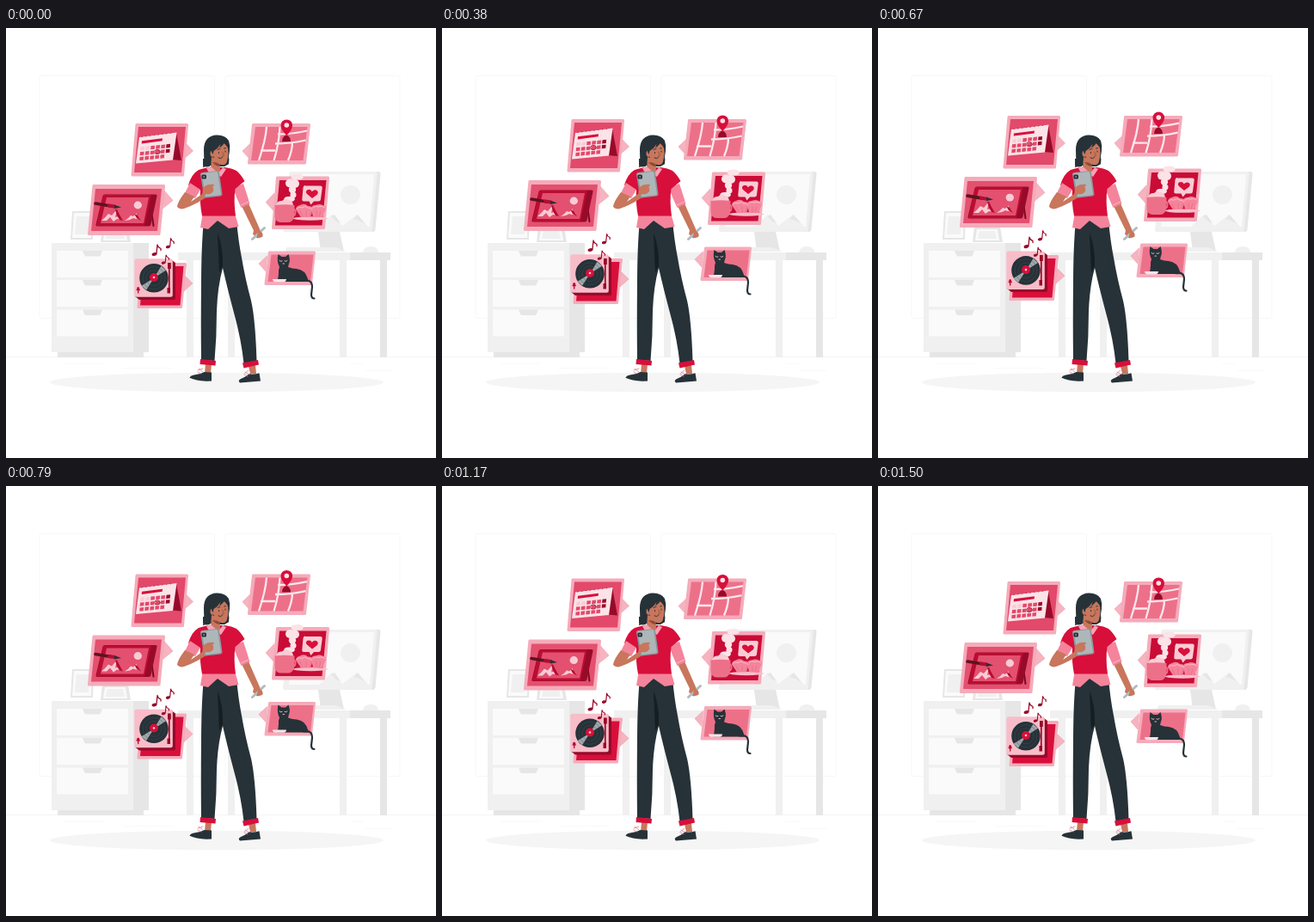
An HTML page that plays this animation: 500x500 px, repeating every 1.54 s.

```html
<!DOCTYPE html>
<html lang="en">
<head>
<meta charset="utf-8">
<title>Floating cards</title>
<style>
  html, body { margin: 0; width: 100%; height: 100%; overflow: hidden; background: #fff; }
  svg { display: block; width: 100%; height: 100%; }
  .g1 { fill: #fafafa; } .g2 { fill: #f5f5f5; } .g3 { fill: #f0f0f0; } .g4 { fill: #e6e6e6; }
  .ink { fill: #263238; } .skin { fill: #c8765c; } .red { fill: #d80f3b; } .dark { fill: #980a2a; }
  .mid { fill: #ed7089; } .rose { fill: #e2496a; } .pink { fill: #f4849b; } .pale { fill: #f9ccd5; }
  .line { fill: none; stroke-linecap: round; stroke-linejoin: round; }
  .card { fill: #f5abba; stroke: #f5abba; stroke-width: 3; stroke-linejoin: round; }
  .tail { fill: #f6b3c0; stroke: #f19aac; stroke-width: .6; }
</style>
</head>
<body>
<svg viewBox="0 0 500 500" xmlns="http://www.w3.org/2000/svg">
  <rect width="500" height="500" fill="#fff"/>

  <!-- room -->
  <g fill="none" stroke="#f7f7f7">
    <rect x="39" y="55.500" width="203.500" height="282" rx="2"/>
    <rect x="255" y="55.500" width="203" height="282" rx="2"/>
    <path d="M0 382.500H500" stroke="#efefef" stroke-width=".7"/>
    <path d="M400 390h16M417 398.500h31M136 395.500h59M68 390h48" stroke-width=".7"/>
  </g>
  <ellipse class="g2" cx="245" cy="412" rx="194" ry="11.300"/>

  <!-- cabinet -->
  <path class="g4" d="M60 376h100v7H60z"/>
  <path class="g4" d="M148 250h18v127h-18z"/>
  <path class="g3" d="M53 250h95v127H53z"/>
  <g id="drawers"></g>
  <path class="g4" d="M77 213h25l-1 33H75z"/><path class="g1" d="M79 215h21l-1 29H77z"/><path class="g3" d="M82 219h15l-1 21H80z"/>
  <path class="g4" d="M112 231h30l3 18h-35z"/><path class="g1" d="M115 234h24l2 13h-28z"/><path class="g3" d="M118 236h18l2 9h-22z"/>

  <!-- desk -->
  <path class="g3" d="M210 270h8v113h-8zM258 270h8v113h-8zM388 270h8v113h-8z"/>
  <path class="g4" d="M435 270h8v113h-8z"/>
  <path class="g3" d="M200 261h200v9H200z"/>
  <path class="g4" d="M400 261h47v9h-47z"/>
  <path class="g4" d="M363 237h25l5 23h-27z"/>
  <path class="g3" d="M326 255h57l13 5h-71z"/>
  <path class="g3" d="M415 261q1-7 9-7q9 0 9 7z"/>
  <path class="g4" d="M333 167h100q3 0 2.500 3l-6 64q-.5 3-3 3H325q-3 0-2.600-3l7-64q.5-3 3.600-3z"/>
  <path class="g3" d="M332 167h97q3 0 2.600 3l-6 67H325q-3 0-2.600-3l7-64q.4-3 2.600-3z"/>
  <path class="g1" d="M335 170h93l-5 61H329z"/>
  <ellipse class="g3" cx="400.500" cy="194" rx="11.500" ry="11"/>
  <path class="g3" d="M364 231l15-14 8 7 4 7zM390 231l18-14 13 14z"/>
  <path class="g4" d="M378 219l4-2 7 10-5-2zM404 222l5-5 9 11-7-4z"/>

  <!-- woman -->
  <path class="skin" d="M232 390l7 1-1 11h-7zM282 393l8-1 1 10h-7z"/>
  <path class="ink" d="M239 400.500v10l-6 .3q-12-.4-19.500-4q.5-2.500 5-3.300q7-.5 12-3.500zM283 402q5 1.500 11.500-.8l1.500 9.300-24 2q-3-2.500 1-4.500q5-2 10-6z"/>
  <path class="line" d="M223 400l4 2m-3-6 5 4m-6-2 6-2M277 403l4 2m-3-5 5 3m-6-1 5-4" stroke="#d98293" stroke-width=".8"/>
  <path class="ink" d="M230 223h38q2 24 6 44q4 24 11 50q5 22 6.500 71l-15 2q-3-28-11-57q-8-30-13.500-54q-6 22-7 50q0 30-2.500 58l-15.500-1q-.5-46 0-86q0-46 3-77z"/>
  <path d="M246 238q1 26 2 46l4-7q1-20-6-39z" fill="#151e23"/>
  <path class="red" d="M226 385l18 2-.5 5.500-18-1.500zM275 389.500l18-3.500 1 5.500-17.500 4z"/>
  <path class="skin" d="M274 207l8-3 14 32q4 4 2 7l-6 1.500-5-5 1-4z"/>
  <path class="line" d="M286.500 245.500l14-13" stroke="#b4babd" stroke-width="3"/>
  <path class="skin" d="M293 235q5 1 5 6q-2 4-6 2z"/>
  <path class="pink" d="M264 186l12-5q4 12 7.500 23.500l-10 4.500q-5-10-9.500-23z"/>
  <path class="line" d="M273 206l9-4" stroke="#f9bac6" stroke-width="1"/>
  <path class="pink" d="M228.500 217h38l4 14-11.500 2-13-9-11 10-9-2z"/>
  <path class="red" d="M224 165q9-3 14-3h16q9 1 14 4q5 4 9.500 12l-11 9q-2 14 .5 31.500h-39q-3-15-2-30l-14-6q4-13 12-17.500z"/>
  <path class="pink" d="M214 180l12 8-6 10-13-4z"/>
  <path class="skin" d="M208 191l11 5-4 6 19-13 4 4q-14 11-31 17q-5 1.500-8-2q0-5 9-17z"/>
  <path class="ink" d="M234 129q5-5 12-4.500q9 0 13 6.500q2 6 1 12q-2 8-1 15l-5 3h-7l-10-1-8 2q2-10 1-20q0-9 4-13z"/>
  <path class="skin" d="M239 150l9 3 1 11q2 4-4 6q-5-1-7-6z"/>
  <path d="M240 156q4 5 9 5v-4z" fill="#8d4937"/>
  <path class="skin" d="M240 142q6-3 9-10q7 2 9.500 9q.5 8-1.500 15q-3 5-8 2.500q-6-2-7.500-9q-4 1-4-3.500q0-3.500 2.500-4z"/>
  <path class="ink" d="M239 144q-4-9 4-13q7-4 12 0q-2 6-8 9q2-2 2.500-5q-3 5-8 8l-1 4zM252 132q6 3 6.500 8l.5 4 1-7-3-6zM258.500 147q1.500 6 .5 11l-4 2q3-5 3.500-13zM229 152h8q-1 6 0 9l-4 .5-4-2z"/>
  <g class="line" stroke="#263238" stroke-width=".9"><path d="M247.500 144.500v1.200M255 143v1.200M246 141.500l3-1M253.500 140l2-.3M247 151q3 2 5-1"/></g>
  <path class="line" d="M251.500 144l2 4-1.800.5" stroke="#8d4937" stroke-width=".7"/>
  <path d="M233 163l5-2 9 8 5-7 4 2-6 9-5-3-6 4z" fill="#f6a3b4"/>
  <path d="M228 168l17.500-2q2-.2 2.500 2l3.500 25q.3 2-2 2.400l-17 2q-2 .2-2.400-2l-4.100-25q-.3-2 2-2.400z" fill="#8b979c"/>
  <path d="M227.500 169l17-2q1.500 0 1.800 1.500l3.500 24q.2 1.500-1.300 1.800l-16.500 2z" fill="#adb6b9"/>
  <rect class="ink" x="227.500" y="170.500" width="5.500" height="5" rx="1.500"/>
  <circle cx="230.200" cy="173" r="1.100" fill="#7d898e"/>
  <path class="skin" d="M229 186q4-4 8-4q5-1 5 1l-2 2q2 1 1 3q1 2-1 3q-2 3-7 2l-5 3z"/>

  <g id="cards">
    <!-- calendar -->
    <path class="tail" d="M208 133l9.500 10-10.500 9z"/>
    <path class="card" d="M152 112.500h58.500l-5 58.500H147z"/>
    <path class="rose" d="M154 115h55l-5 53h-55z"/>
    <path class="dark" d="M198 122l6 32-11-1z"/>
    <path d="M155 127l43.500-5.500-4.500 32-43 4z" fill="#fbe3e8"/>
    <path class="red" d="M158 131.300l24-3-.3 3-24 3.200z"/>
    <g id="days" transform="matrix(1 -.1 -.08 1 156.500 138.300)"></g>
    <ellipse class="line" cx="176" cy="144" rx="3.200" ry="2.600" stroke="#980a2a" stroke-width=".8"/>
    <path class="line" d="M158 126.300l38-4.700" stroke="#b8405c" stroke-width="1.400" stroke-dasharray=".1 4.700"/>

    <!-- tablet -->
    <path class="tail" d="M184 189l10 11.500-12 9.500z"/>
    <path class="card" d="M102 183.500h81.500l-5.500 56H96.500z"/>
    <path d="M104 187h77l-5 49H99z" fill="#e4506f"/>
    <path class="line" d="M168 205l3.500 25" stroke="#7c0821" stroke-width="2"/>
    <path class="dark" d="M115 193.500h59q2 0 1.500 2l-7 33q-.4 2-2.500 2h-60q-2 0-1.500-2l8-33q.5-2 2.500-2z"/>
    <path d="M114.500 194h53q1.500 0 1 2l-7 32q-.5 2-2 2h-53q-1.500 0-1-2l7-32q.5-2 2-2z" fill="#ba0d33"/>
    <path d="M117 197h49l-6 30h-50z" fill="#e4506f"/>
    <ellipse class="pale" cx="153.300" cy="206" rx="4.700" ry="4.400"/>
    <path class="pale" d="M111 224q5-4 8-8l4 2 6-7-2 9 4-1 3 4-5-1-4 3-4-5-4 4zM138 224q5-3 7-6l3 1 4-4-1 5 5 1-5 1-3-1-4 2z"/>
    <path d="M127 211h2l3 6 4 7-4-1-3-5zM149 216l4 2 4 6-5-3z" fill="#b40c31"/>
    <path class="line" d="M104 204l18 3" stroke="#5d1320" stroke-width="3.600"/>
    <path class="line" d="M120 206.500l6 1" stroke="#b40c31" stroke-width="4"/>
    <path class="ink" d="M126 205.500l8 3-8 1.500z"/>

    <!-- turntable -->
    <path class="tail" d="M208 288l9 9-10 9z"/>
    <path class="card" d="M158 274.500h50.500l-5 50H154z"/>
    <path class="red" d="M160 277h46.500l-4 45.500H156z"/>
    <path class="dark" d="M151 270h42l4 3v41q0 2-2 2h-40l-5-4z"/>
    <rect x="149.300" y="268.300" width="44.500" height="44.500" rx="2.500" fill="#f8bdc9"/>
    <circle class="ink" cx="172" cy="290.800" r="16.800"/>
    <path d="M172 290.800l8.500-14 5.500 5zM172 290.800l-9 14-5.500-5z" fill="#a0a8ab"/>
    <g class="line" stroke="#485359" stroke-width=".4"><circle cx="172" cy="290.800" r="13"/><circle cx="172" cy="290.800" r="9"/></g>
    <circle class="red" cx="172" cy="290" r="5"/>
    <circle class="pale" cx="172" cy="290" r="1.300"/>
    <path class="line" d="M189.800 274v31" stroke="#980a2a" stroke-width="1.700"/>
    <path class="dark" d="M188 273h3.800v7H188zM187.500 302h3.500v6.500h-3.500z"/>
    <path class="line" d="M153.700 302v6m-1.600-3.500h3.200" stroke="#b40c31" stroke-width="1.300"/>
    <circle cx="153.700" cy="302.800" r="1.600" fill="#b40c31"/>
    <g class="dark">
      <g id="note"><ellipse cx="172.500" cy="263" rx="3" ry="1.900" transform="rotate(-15 172.500 263)"/><path class="line" d="M175 262l1-10q.5 3 4 4.500v2" stroke="#980a2a" stroke-width="1.300"/></g>
      <use href="#note" transform="translate(33.200 17.800) scale(.9)"/>
      <use href="#note" transform="translate(40 54.800) scale(.83)"/>
    </g>

    <!-- map -->
    <path class="tail" d="M284.500 134l-9.500 9 8 9z"/>
    <path class="card" d="M287.500 112.500h65l-5 44.500h-65z"/>
    <path class="mid" d="M290 115h60.500l-5 39H285z"/>
    <g fill="none" stroke="#fce8ec" stroke-width="2.300">
      <path d="M303 115q-1 15-9 39M318.500 115q-1 20-7 39M316 123.500q16 0 34-4M296 142.500h17M313 134.500q18 0 35.500-4M333 132.500q0 10-5 21.500"/>
    </g>
    <path class="dark" d="M321 132q0-6 5-7.500q5 1.500 5 7.500z"/>
    <path class="red" d="M326.300 125q-6.800-7-6.800-12a6.800 6.600 0 0 1 13.600 0q0 5-6.800 12z"/>
    <circle cx="326.300" cy="113" r="2.800" fill="#fbe3e8"/>

    <!-- cafe -->
    <path class="tail" d="M312 192l-9.800 10.500 8.800 10z"/>
    <path class="card" d="M315.500 174h59l-5 58.500h-59z"/>
    <path d="M318 177h54.500l-5 52.500h-54.500z" fill="#c90c36"/>
    <g fill="#fbe3e8">
      <path d="M332 175q-2-5 4-5q4-1 7 0q4 2 2 5q-3 2-6 1l-5 1z"/>
      <circle cx="330" cy="180.500" r="5"/><circle cx="336" cy="181" r="5"/>
      <circle cx="333" cy="188" r="4.200"/><circle cx="334" cy="194" r="3.500"/>
      <path d="M323 203q-1-8 6-7q6-2 7 3q-1 3-5 3z"/>
    </g>
    <path class="pale" d="M314 207q1-7 7-6q4-4 8-1q5 1 5 7z"/>
    <path class="line" d="M333 210q5 1 3 7l-4 3" stroke="#ed7089" stroke-width="2"/>
    <path class="mid" d="M312.500 206q12-1.500 23 0l-.5 14q-2 6-7 6h-8q-6 0-7.500-6z"/>
    <path class="pale" d="M346 183l19.500.5q2.500.2 2.200 2.500l-1.700 13q-.2 2.500-3 2.500h-5l-3.500 4-2-4h-6q-2.500 0-2.200-2.500l1.200-13.500q.2-2.500 2.500-2.500z"/>
    <path class="red" d="M356 198l-6-5q-2.500-3 .5-4.800q3.500-1.200 5.300 2q2.800-3 5.700-1.300q2.400 2 .2 4.800z"/>
    <ellipse cx="354" cy="221.500" rx="20" ry="2.200" fill="#f8bdc9"/>
    <path class="pink" d="M337 211q0-4 5-5q5-3 9 1q6 0 6 4l-3 9h-11zM355 210q0-4 5-4q5-2 8 0q5 1 4 4l-4 10h-11z"/>
    <path class="line" d="M342 213l3 6m4-6v6m6-6-2 6m8-6v6m5-6-2 6" stroke="#ed7089" stroke-width="1"/>
    <path class="line" d="M338 210q3-3 6-1q4-3 7 0q3 0 5 2m1-2q3-3 6-1q4-2 8 1" stroke="#f8bdc9" stroke-width="1"/>

    <!-- cat -->
    <path class="tail" d="M303.500 265l-9.500 9 8 9z"/>
    <path class="card" d="M306.500 261h52l-4 36.500h-52.500z"/>
    <path class="mid" d="M308.500 263.500h49l-3.500 31.500h-49.500z"/>
    <path class="ink" d="M316.500 263l4 3h4.500l3.500-3q2.500 7 .5 11l-1 4q5 2 10 2q10 1 13 12l2 3h-38q2-5 2-10q-.5-4 1-7q-3.500-7-1.500-15z"/>
    <path class="line" d="M346 294h6q4 1 4 7l-1 9q0 4.500 3.500 4.500" stroke="#263238" stroke-width="2.200"/>
    <path class="line" d="M318 270.500q1.500 1.500 3 .5m3 0q1.500 1 3-.5M322 274h1.500" stroke="#f9ccd5" stroke-width=".9"/>
    <path d="M310 292h16q-.5 3.300-3 3.300h-10q-2.500 0-3-3.300z" fill="#fbe3e8"/>
  </g>
</svg>
<script>
  const byId = id => document.getElementById(id);

  byId('drawers').innerHTML = [259, 293, 327.5].map(y =>
    `<path class="g1" d="M59 ${y}h83v31H59z"/>` +
    `<path class="g4" d="M89 ${y}h23l-2 5q-.5 1.500-2 1.500H93q-1.500 0-2-1.500z"/>`).join('');

  let cells = '';
  for (let row = 0; row < 3; row++) {
    for (let col = 0; col < 6; col++) {
      if (row === 2 && col === 5) continue;
      const fill = row === 0 && col < 2 ? 'pale' : row < 2 && col === 5 ? 'dark' : 'rose';
      cells += `<rect class="${fill}" x="${col * 6}" y="${row * 5.8}" width="4.6" height="4.2"/>`;
    }
  }
  byId('days').innerHTML = cells;

  // A linear 10px float sampled at 24 steps per second
  const LOOP = 1540, STEPS = 37, CYCLE = 1500, START = 36;
  const lift = ms => 10 * (1 - Math.abs((ms + START) % CYCLE / (CYCLE / 2) - 1));
  const cards = byId('cards');

  function draw(now) {
    const step = Math.floor((now % LOOP + 1) / LOOP * STEPS) % STEPS;
    const dy = lift(0) - lift(step * 1000 / 24);
    cards.setAttribute('transform', `translate(0 ${dy.toFixed(2)})`);
    requestAnimationFrame(draw);
  }
  draw(0);
</script>
</body>
</html>
```
